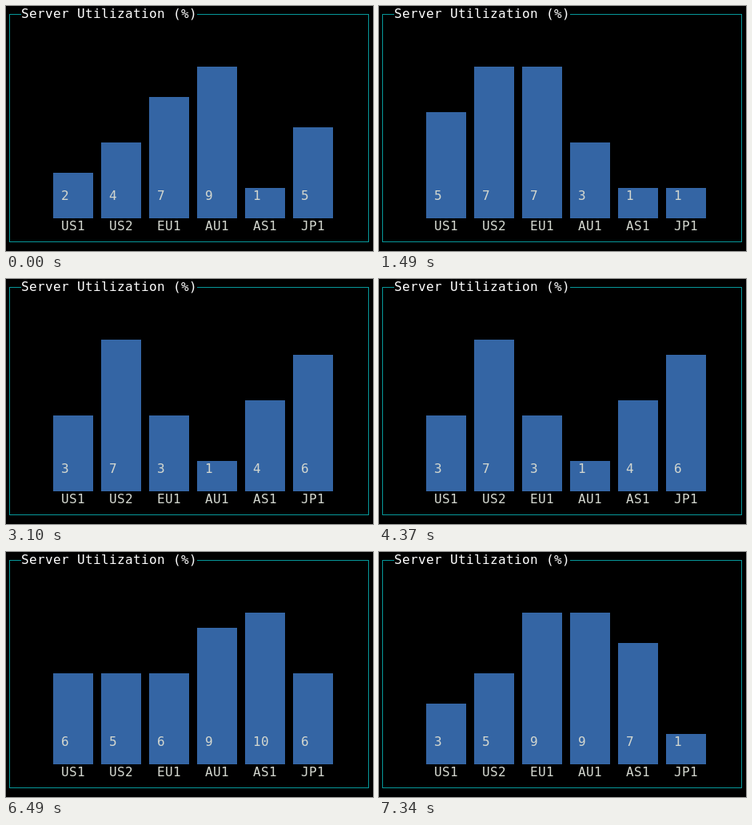
Write an HTML page that moves like this. It is 459 by 307 pixels and loops after 8390 ms.

```html
<!DOCTYPE html>
<html lang="en">
<head>
<meta charset="utf-8">
<title>Server Utilization</title>
<style>
  html, body { margin: 0; width: 100%; height: 100%; overflow: hidden; background: #000; }
  svg { display: block; }
  text { font: 16px "DejaVu Sans Mono", monospace; fill: #d3d7cf; white-space: pre; }
  .title { fill: #fff; }
  .border { fill: none; stroke: #06989a; shape-rendering: crispEdges; }
  .bar { fill: #3465a4; shape-rendering: crispEdges; }
</style>
</head>
<body>
<svg id="stage" width="459" height="307" viewBox="0 0 459 307">
  <path class="border" d="M19 10.5H4.5V295.5H453.5V10.5H239"/>
</svg>
<script>
  const CELL_W = 10, CELL_H = 19, ASCENT = 15, BASE_ROW = 14;
  const LOOP = 8390;
  const names = ["US1", "US2", "EU1", "AU1", "AS1", "JP1"];
  const samples = [
    { at: 0, values: [2, 4, 7, 9, 1, 5] },
    { at: 1490, values: [5, 7, 7, 3, 1, 1] },
    { at: 3100, values: [3, 7, 3, 1, 4, 6] },
    { at: 5220, values: [6, 5, 6, 9, 10, 6] },
    { at: 7340, values: [3, 5, 9, 9, 7, 1] }
  ];
  const stage = document.getElementById("stage");

  function add(tag, attrs) {
    const el = document.createElementNS("http://www.w3.org/2000/svg", tag);
    for (const key in attrs) el.setAttribute(key, attrs[key]);
    return stage.appendChild(el);
  }

  const colX = col => col * CELL_W - 1;

  // One x per character keeps the text on the terminal grid.
  function write(el, col, str) {
    el.setAttribute("x", [...str].map((c, i) => colX(col + i)).join(" "));
    el.textContent = str;
  }

  function label(col, row, str, cls = "") {
    const el = add("text", { y: row * CELL_H + ASCENT, class: cls });
    write(el, col, str);
    return el;
  }

  label(2, 0, "Server Utilization (%)", "title");

  const bars = names.map((name, i) => {
    const col = 6 + i * 6;
    const rect = add("rect", { class: "bar", x: colX(col), width: 5 * CELL_W });
    label(col + 1, BASE_ROW, name);
    return { col, rect, value: label(col + 1, BASE_ROW - 2, "") };
  });

  function show({ values }) {
    const max = Math.max(...values);
    bars.forEach((bar, i) => {
      const rows = Math.round(values[i] / max * 9) + 1;
      bar.rect.setAttribute("y", (BASE_ROW - rows) * CELL_H);
      bar.rect.setAttribute("height", rows * CELL_H);
      write(bar.value, bar.col + 1, String(values[i]));
    });
  }

  let current;
  const start = performance.now();

  function tick() {
    const t = (performance.now() - start) % LOOP;
    const sample = samples.findLast(s => s.at <= t);
    if (sample !== current) show(current = sample);
    requestAnimationFrame(tick);
  }
  tick();
</script>
</body>
</html>
```
